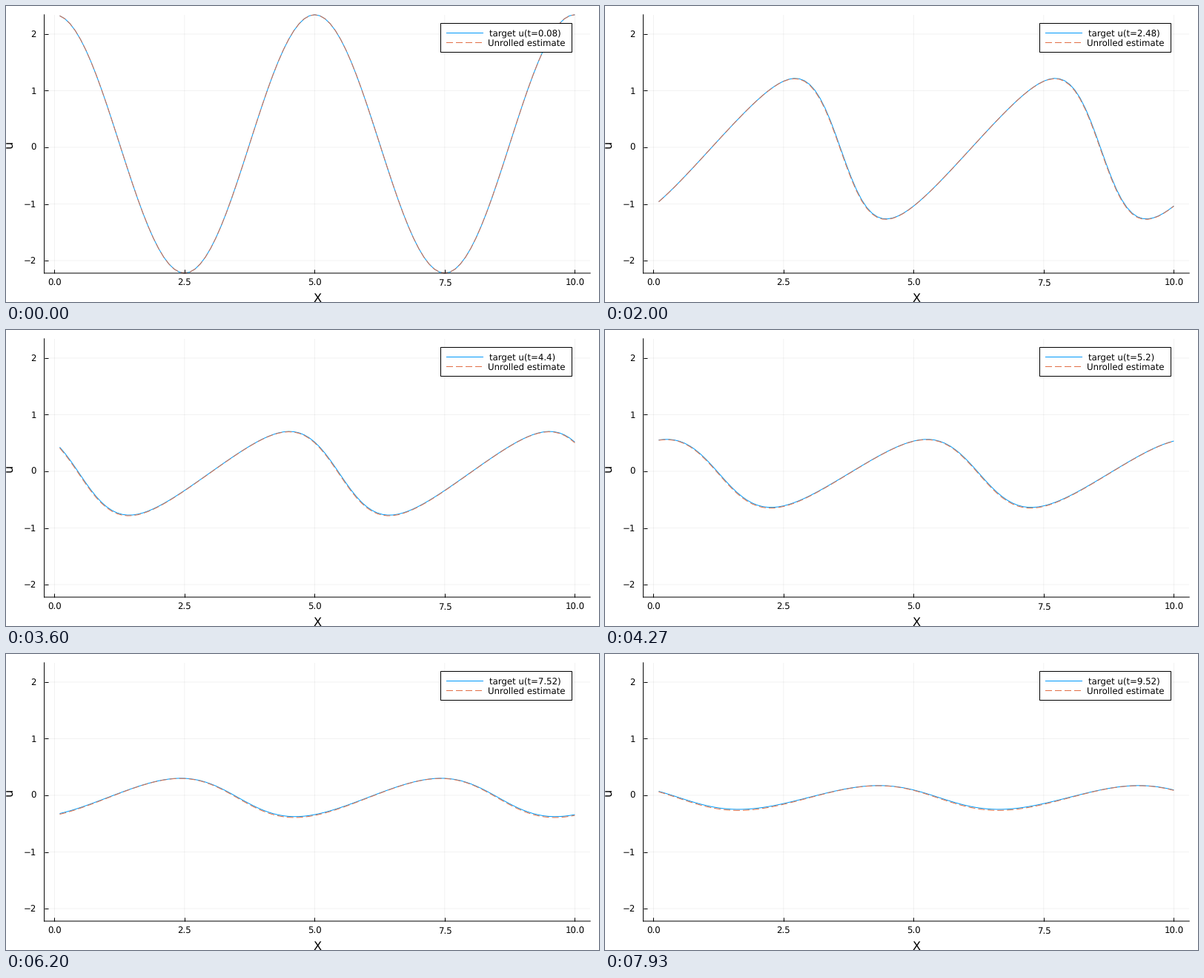
These frames come from a looping animation (800 px wide and 400 px high, 8000 ms). A matplotlib script:

```python
import numpy as np
import matplotlib.pyplot as plt
from matplotlib.animation import FuncAnimation
from matplotlib.patches import Rectangle

W, H, DPI = 800, 400, 100
FRAMES, DT, LOOP = 120, 0.08, 8000
BLUE, ORANGE = "#009afa", "#e26f46"
PX = 72 / DPI  # one pixel in points
DASH = (0, (9, 4))

# viscous Burgers wave, solved in the frame that travels with it
PERIOD, SPEED = 5.0, 0.978
STEEP, NU, AMP = 0.22, 0.1475, 2.282
N, SUB = 48, 10
WAVENUM = 2 * np.pi / PERIOD * np.arange(N // 2 + 1)
XS = np.linspace(0.1, 10, 100)


def rate(c):
    v = np.fft.irfft(c, N)
    return -0.5j * STEEP * WAVENUM * np.fft.rfft(v * v) - NU * WAVENUM**2 * c


def solve():
    c = np.fft.rfft(AMP * np.cos(2 * np.pi * np.arange(N) / N))
    h = DT / SUB
    states = [c]
    for _ in range(FRAMES - 1):
        for _ in range(SUB):
            k1 = rate(c)
            k2 = rate(c + h / 2 * k1)
            k3 = rate(c + h / 2 * k2)
            k4 = rate(c + h * k3)
            c = c + h / 6 * (k1 + 2 * k2 + 2 * k3 + k4)
        states.append(c)
    return states


STATES = solve()


def wave(i, x):
    s = i * DT
    phase = np.exp(1j * np.outer(x - SPEED * s, WAVENUM[1:-1]))
    mean = -0.0375 + 0.0975 * np.exp(-0.8 * s)
    return mean + 2 / N * (phase @ STATES[i][1:-1]).real


def estimate(i):
    s = i * DT
    shift = 0.008 * (1 - np.exp(-s))
    drop = 0.009 * (1 - np.exp(-s / 1.5))
    gain = 1 + 0.04 * (s / 9.6) ** 3
    return gain * wave(i, XS + shift) - drop


plt.rcParams["font.family"] = "DejaVu Sans"
plt.rcParams["text.hinting"] = "none"
plt.rcParams["path.snap"] = False
fig = plt.figure(figsize=(W / DPI, H / DPI), dpi=DPI, facecolor="white")

LEFT, RIGHT, TOP, BOTTOM = 51.6, 788.2, 11.8, 361
ax = fig.add_axes([LEFT / W, 1 - BOTTOM / H, (RIGHT - LEFT) / W, (BOTTOM - TOP) / H])
ax.set_xlim(-0.197, 10.297)
ax.set_ylim(-2.222, 2.342)
ax.set_xticks(np.arange(0, 10.1, 2.5), [])
ax.set_yticks(range(-2, 3), [])
ax.tick_params(direction="in", length=5 * PX, width=PX)
ax.grid(color="black", alpha=0.1, lw=0.5 * PX)
ax.set_axisbelow(True)
for side in ("top", "right"):
    ax.spines[side].set_visible(False)
for side in ("left", "bottom"):
    ax.spines[side].set_linewidth(PX)


def stroke(axes, x, y, color, **kw):
    return axes.plot(x, y, color=color, lw=PX, solid_capstyle="butt",
                     dash_capstyle="butt", clip_on=False, **kw)[0]


target = stroke(ax, [], [], BLUE)
guess = stroke(ax, [], [], ORANGE, ls=DASH)

# overlay in pixel coordinates for the labels and the legend
over = fig.add_axes([0, 0, 1, 1], facecolor="none")
over.set_xlim(0, W)
over.set_ylim(H, 0)
over.axis("off")


def label(x, y, text, size=11.8, **kw):
    return over.text(x, y, text, fontsize=size * PX, va="baseline", **kw)


for v in ax.get_xticks():
    label(65.4 + 70.2 * v, 378.3, f"{v:.1f}", ha="center")
for v in ax.get_yticks():
    label(41, 195.2 - 76.5 * v, f"{v}".replace("-", "\u2212"), ha="right")
label(419.9, 400, "X", 16.2, ha="center")
label(9, 186.4, "u", 16.2, rotation=90, rotation_mode="anchor", ha="center")

over.add_patch(Rectangle((586.5, 23.5), 177, 39, fc="white", ec="black", lw=PX))
stroke(over, [594, 644], [36.5, 36.5], BLUE)
stroke(over, [594, 644], [49.5, 49.5], ORANGE, ls=DASH)
caption = label(651.6, 40.9, "")
label(650, 53.7, "Unrolled estimate")


def update(i):
    target.set_data(XS, wave(i, XS))
    guess.set_data(XS, estimate(i))
    caption.set_text(f"target u(t={round((i + 1) * DT, 2)})")
    return target, guess, caption


anim = FuncAnimation(fig, update, frames=FRAMES, interval=LOOP / FRAMES, repeat=True)
plt.show()
```
